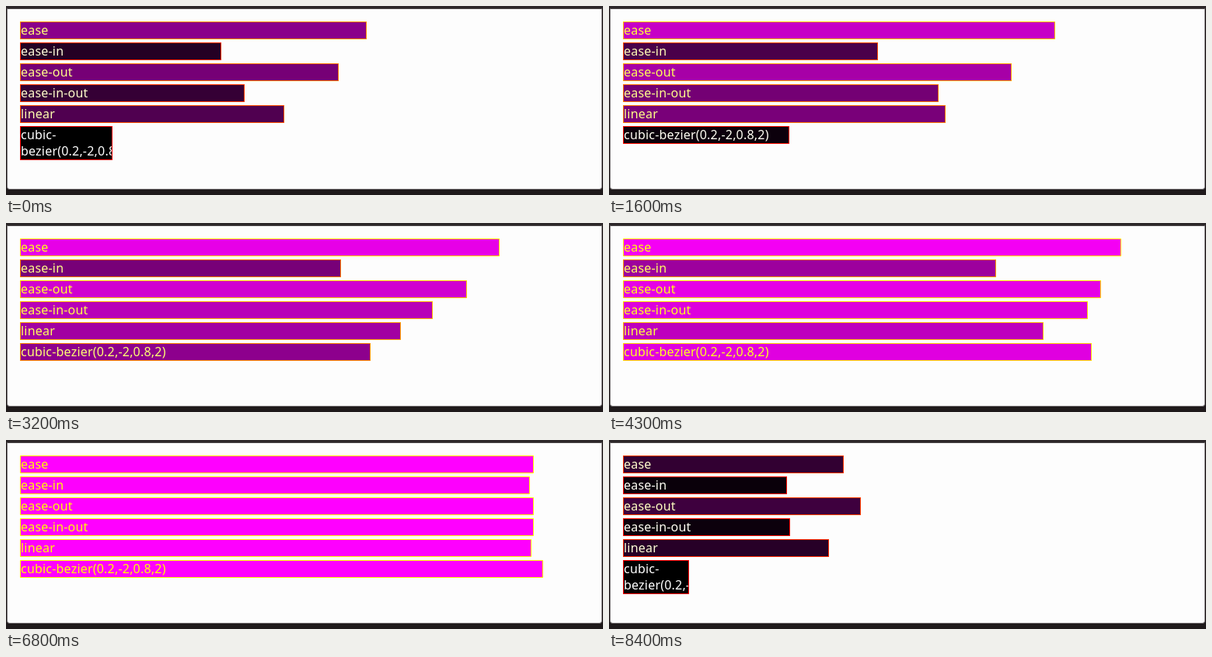
An HTML page for the animation above (8500 ms loop, 768 px wide and 244 px high).

```html
<!DOCTYPE html>
<html lang="en">
<head>
<meta charset="utf-8">
<title>Timing functions</title>
<style>
  @property --p { syntax: "<number>"; inherits: false; initial-value: 0; }

  html, body { margin: 0; width: 100%; height: 100%; overflow: hidden; background: #1f1a1b; }

  .panel {
    position: absolute; left: 1px; top: 3px; width: 766px; height: 234px;
    box-sizing: border-box; border: 1px solid #777374; border-top-color: #4a4647;
    border-radius: 0 0 4px 4px; background: #fdfdfd;
  }
  .cap { position: absolute; left: 0; top: 0; width: 768px; height: 3px; background: #2c2729; }

  .view { position: absolute; left: 18px; top: 20px; width: 732px; height: 183px; overflow: hidden; }

  .bar {
    --p: 0;
    /* below zero progress the bar shrinks towards nothing */
    width: max(190.8px + 468px * var(--p), 190.8px + 190.8px * var(--p));
    margin-bottom: 4px; border: 1px solid; overflow: hidden;
    font: 16px/21px "Noto Sans", "Open Sans", sans-serif; letter-spacing: .2px;
    animation: grow 10s infinite paused;
  }
  @keyframes grow {
    from { --p: 0; background-color: #000; border-color: #f00; color: #fff; }
    to   { --p: 1; background-color: #f0f; border-color: #ff0; color: #ff0; }
  }

  .scroll { position: absolute; left: 18px; top: 203px; width: 732px; height: 17px; background: #f1f1f1; visibility: hidden; }
  .thumb { position: absolute; left: 17px; top: 2px; height: 13px; background: #c1c1c1; }
  .arrow { position: absolute; top: 5px; border: solid transparent; border-width: 3.5px 4px; }
  .prev { left: 2px; border-right-color: #a3a3a3; }
  .next { right: 2px; border-left-color: #505050; }
</style>
</head>
<body>
  <div class="cap"></div>
  <div class="panel"></div>
  <div class="view"></div>
  <div class="scroll">
    <div class="arrow prev"></div>
    <div class="thumb"></div>
    <div class="arrow next"></div>
  </div>
<script>
  const LOOP = 8500, STEP = 100, CYCLE = 10000, PHASE = 3145;
  const EASINGS = ["ease", "ease-in", "ease-out", "ease-in-out", "linear", "cubic-bezier(0.2,-2,0.8,2)"];
  const find = selector => document.querySelector(selector);
  const view = find(".view"), scroll = find(".scroll"), thumb = find(".thumb");

  const animations = EASINGS.map(easing => {
    const bar = document.createElement("div");
    bar.className = "bar";
    bar.textContent = easing;
    bar.style.animationTimingFunction = easing;
    view.append(bar);
    return bar.getAnimations()[0];
  });

  function draw(now) {
    const time = Math.floor(now % LOOP / STEP) * STEP;
    for (const animation of animations) animation.currentTime = (time + PHASE) % CYCLE;

    const content = view.scrollWidth, visible = view.clientWidth;
    scroll.style.visibility = content > visible ? "visible" : "hidden";
    thumb.style.width = (visible - 34) * visible / content + "px";
  }

  function tick() {
    draw(performance.now());
    requestAnimationFrame(tick);
  }
  tick();
</script>
</body>
</html>
```
